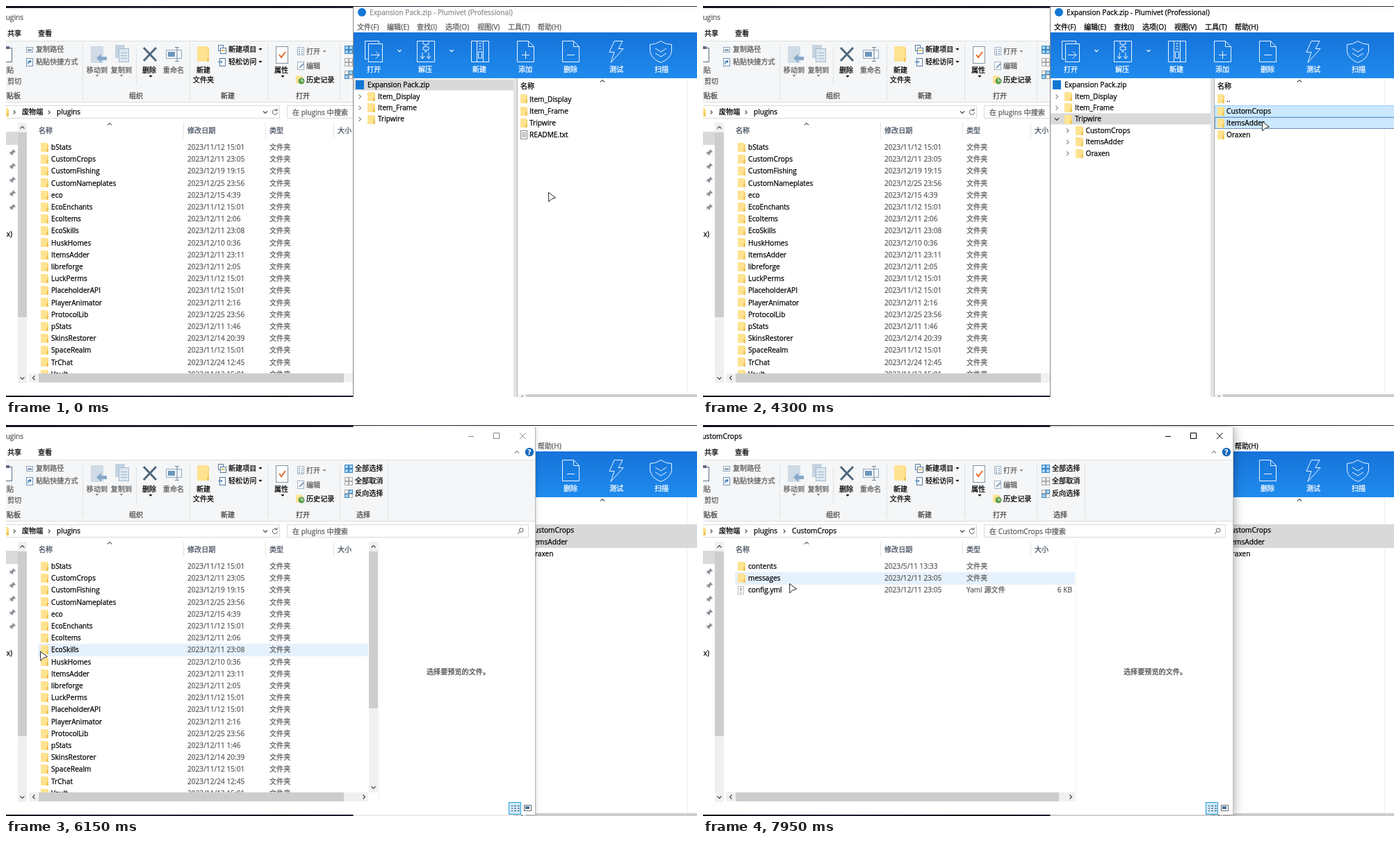
Write an HTML page with a canvas that moves like this. It is 994x563 px and loops after 8000 ms.

```html
<!DOCTYPE html>
<html lang="zh-CN">
<head>
<meta charset="utf-8">
<title>Copying plugin folders</title>
<style>
html, body { margin: 0; width: 100%; height: 100%; overflow: hidden; background: #fff; }
canvas { display: block; }
</style>
</head>
<body>
<canvas id="stage" width="994" height="563"></canvas>
<script>
const ctx = document.getElementById('stage').getContext('2d');
const LOOP = 8000;
const FONT = '"Open Sans", "Noto Sans CJK SC", "Noto Sans CJK", sans-serif';
const INK = '#000', GREY = '#5c5c5c', PALE = '#8c8c8c', BLUE = '#3a78b5';

// Moments (ms) at which the interface changes abruptly
const AT = {
  selectFolder: 1400, treeRefresh: 1570, openFolder: 1660,
  pickFirst: 3200, pickSecond: 4050, drop: 5550, copied: 6400,
  pickTarget: 7400, openTarget: 7600
};

// Pointer stops: time, x, y
const STOPS = [
  [0, 780, 268], [200, 780, 268], [1150, 778, 178], [1750, 778, 178],
  [2550, 796, 158], [3300, 796, 156], [3950, 804, 166], [4350, 804, 166],
  [5450, 40, 330], [5900, 40, 330], [6950, 102, 299], [7330, 118, 226],
  [7650, 118, 226], [7950, 124, 228], [8000, 124, 228]
];

const PLUGINS = `bStats,11/12 15:01;CustomCrops,12/11 23:05;CustomFishing,12/19 19:15;
CustomNameplates,12/25 23:56;eco,12/15 4:39;EcoEnchants,11/12 15:01;EcoItems,12/11 2:06;
EcoSkills,12/11 23:08;HuskHomes,12/10 0:36;ItemsAdder,12/11 23:11;libreforge,12/11 2:05;
LuckPerms,11/12 15:01;PlaceholderAPI,11/12 15:01;PlayerAnimator,12/11 2:16;
ProtocolLib,12/25 23:56;pStats,12/11 1:46;SkinsRestorer,12/14 20:39;SpaceRealm,11/12 15:01;
TrChat,12/24 12:45;Vault,11/12 15:01`.split(';').map(row => row.trim().split(','));
const COPIED_DATES = { CustomCrops: '5/11 13:33', ItemsAdder: '4/19 23:00' };
const CROPS = [['contents', '5/11 13:33'], ['messages', '12/11 23:05'], ['config.yml', '12/11 23:05']];

function pointerAt(t) {
  const i = Math.max(1, STOPS.findIndex(stop => stop[0] > t));
  const [t0, x0, y0] = STOPS[i - 1], [t1, x1, y1] = STOPS[i];
  const k = (t - t0) / (t1 - t0), ease = k * k * (3 - 2 * k);
  return { x: x0 + (x1 - x0) * ease, y: y0 + (y1 - y0) * ease };
}

function rect(x, y, w, h, color) {
  ctx.fillStyle = color;
  ctx.fillRect(x, y, w, h);
}

function frame(x, y, w, h, color, dash = []) {
  ctx.strokeStyle = color;
  ctx.lineWidth = 1;
  ctx.setLineDash(dash);
  ctx.strokeRect(x + .5, y + .5, w - 1, h - 1);
  ctx.setLineDash([]);
}

function line(path, color, width = 1) {
  ctx.strokeStyle = color;
  ctx.lineWidth = width;
  ctx.stroke(new Path2D(path));
}

function fill(path, color) {
  ctx.fillStyle = color;
  ctx.fill(new Path2D(path));
}

function disc(x, y, r, color) {
  ctx.fillStyle = color;
  ctx.beginPath();
  ctx.arc(x, y, r, 0, 7);
  ctx.fill();
}

// y is the visual middle of the line; a hairline stroke gives the sturdier screen look
function text(str, x, y, color = INK, align = 'left', weight = 400) {
  ctx.font = `${weight} 10.15px ${FONT}`;
  ctx.textAlign = align;
  ctx.fillStyle = ctx.strokeStyle = color;
  ctx.lineWidth = .25;
  ctx.fillText(str, x, y + 3.7);
  ctx.strokeText(str, x, y + 3.7);
}

function chevron(x, y, dir, color = '#444', r = 3) {
  const [a, b] = { up: [0, -1], down: [0, 1], left: [-1, 0], right: [1, 0] }[dir];
  const h = r / 2;
  line(`M${x - a * h - b * r} ${y - b * h - a * r}L${x + a * h} ${y + b * h}L${x - a * h + b * r} ${y - b * h + a * r}`, color, 1.2);
}

function caret(x, y, color = INK) {
  fill(`M${x - 2.5} ${y - 1}h5l-2.5 3z`, color);
}

function folder(x, y, w = 11, h = 13) {
  rect(x, y - h / 2, w - 1, h, '#ffe391');
  rect(x + w - 2, y - h / 2 + 2, 2, h - 2, '#f8d775');
  rect(x + w - 3, y + h / 2 - 5, 3, 5, '#efc65c');
}

function page(x, y, w, h, color = '#888') {
  rect(x, y, w, h, '#fff');
  frame(x, y, w, h, color);
}

function tick(x, y, color) {
  line(`M${x - 4} ${y}l3 4l6-8`, color, 2);
}

function desktop() {
  const g = ctx.createLinearGradient(0, 0, 994, 0);
  ['#15131f', '#292438', '#171420', '#332a45', '#10101a', '#252338'].forEach((c, i) => g.addColorStop(i / 5, c));
  rect(0, 0, 994, 563, g);
}

function drawExplorer(t, pointer) {
  const raised = t >= AT.drop, active = t >= AT.copied, inside = t >= AT.openTarget;
  const name = inside ? 'CustomCrops' : 'plugins';
  const right = active ? 763 : 762;

  ctx.save();
  ctx.shadowColor = active ? 'rgba(0,0,0,.4)' : 'rgba(0,0,0,.2)';
  ctx.shadowBlur = active ? 14 : 6;
  rect(-20, 3, right + 20, 558, '#fff');
  ctx.restore();
  line(`M${right - .5} 3v558`, active ? '#c4c4c4' : '#b4b4b4');

  const titleInk = active ? INK : PALE;
  text(name, inside ? 56 : 25, 16, active ? INK : GREY, 'right');
  line('M665 16.5h8', titleInk);
  frame(701, 11, 9, 9, titleInk);
  line('M739 11.5l8.5 8.5m0-8.5l-8.5 8.5', titleInk);
  text('共享', 2, 39);
  text('查看', 46, 39);
  chevron(735, 39, 'up', PALE);
  disc(753, 39, 6.2, '#1769bd');
  text('?', 753, 39, '#fff', 'center', 700);

  drawRibbon(right);
  drawAddress(name, active, inside);
  drawNavigation();
  drawFiles(t, pointer, raised, active, inside);

  text('选择要预览的文件。', 605, 355, '#444');
  rect(723, 543, 18, 18, '#cce8ff');
  frame(723, 543, 18, 18, '#26a0da');
  for (let i = 0; i < 3; i++) {
    line(`M727 ${548.5 + i * 3.5}h2m2 0h3m2 0h3`, '#345');
  }
  frame(745, 547, 11, 9, '#666');
  rect(747, 549, 6, 4, '#47719a');
}

function drawRibbon(right) {
  rect(0, 50, right - 1, 89, '#f5f6f7');
  line(`M0 50.5H${right - 1}M0 138.5H${right - 1}`, '#dcdddf');
  line('M110.5 54v81M264.5 54v81M376.5 54v81M480.5 54v81M549.5 54v81M187.5 60v54', '#e0e1e3');

  // Clipboard
  page(-8, 60, 17, 21, '#587089');
  rect(-8, 58, 13, 4, '#668');
  text('粘贴', 11, 92, GREY, 'right');
  text('剪切', 2, 108, GREY);
  text('剪贴板', 21, 129, '#444', 'right');
  frame(29, 59, 10, 8, '#8fa6bd');
  line('M31 63.5h6', '#5c83a8', 2);
  text('复制路径', 43, 62.5, GREY);
  page(29, 75, 10, 12, '#6c93bb');
  line('M32 84v-4h4m-2-2l2 2-2 2', BLUE, 1.3);
  text('粘贴快捷方式', 43, 80.5, GREY);

  // Organise
  rect(122, 58, 18, 24, '#cfdbe6');
  fill('M130 75l7-6v4h8v5h-8v4z', '#86a9cb');
  text('移动到', 131, 92, GREY, 'center');
  rect(157, 56, 14, 19, '#c6d3df');
  page(162, 61, 15, 20, '#a4bace');
  rect(163, 62, 13, 18, '#dce7f1');
  line('M165 67.5h9m-9 4h9m-9 4h9', '#a4bace');
  text('复制到', 166, 92, GREY, 'center');
  caret(131, 100, PALE);
  caret(166, 100, PALE);
  line('M198 60l18 19m0-19l-18 19', '#50677f', 3);
  text('删除', 206, 92.5, INK, 'center');
  caret(208, 101);
  frame(230, 63, 23, 13, '#8ca9c5');
  rect(233, 66, 10, 7, '#6d96bd');
  line('M243 59.5h6m-3 0v20m-3 0h6', '#71869a');
  text('重命名', 241, 92, GREY, 'center');
  text('组织', 187, 129, '#444', 'center');

  // New
  folder(275, 69, 17, 22);
  text('新建', 284, 92, INK, 'center');
  text('文件夹', 284, 106, INK, 'center');
  page(305, 56, 8, 9, '#53789c');
  page(308, 60, 9, 9, '#53789c');
  rect(310, 63, 5, 2, '#e2b94c');
  text('新建项目', 320, 62.5);
  page(307, 75, 9, 12, '#53789c');
  line('M305 80.5h6m-2-2l2 2-2 2', BLUE);
  text('轻松访问', 320, 80.5);
  caret(366, 62);
  caret(366, 80);
  text('新建', 319, 129, '#444', 'center');

  // Open
  page(388, 58, 18, 25, '#8492a0');
  tick(397, 70, '#e36b2f');
  text('属性', 396, 92.5, INK, 'center');
  caret(398, 101);
  page(419, 59, 10, 12, '#9fb2c5');
  line('M421 62.5h2m2 0h2m-6 3h2m2 0h2m-6 3h2m2 0h2', '#6f92b3', 1.5);
  text('打开', 432, 65.5, GREY);
  caret(458, 65, PALE);
  page(419, 80, 10, 12, '#9fb2c5');
  line('M422 89l6-6', '#7f9cb8', 2);
  text('编辑', 432, 86, GREY);
  folder(417, 106, 10, 11);
  disc(425, 108, 4.5, '#5da14c');
  line('M425 105v3h3', '#fff');
  text('历史记录', 432, 106);
  text('打开', 427, 129, '#444', 'center');

  // Select
  [62.5, 80.5, 98.5].forEach((y, row) => {
    for (let i = 0; i < 4; i++) {
      const on = row === 0 || row === 2 && (i === 1 || i === 2);
      const x = 487 + i % 2 * 6, top = Math.round(y - 6) + (i >> 1) * 6;
      rect(x, top, 6, 6, on ? '#a9d4f4' : '#f7f7f7');
      frame(x, top, 6, 6, on ? '#3b87c3' : '#aaa');
    }
    text(['全部选择', '全部取消', '反向选择'][row], 502, y);
  });
  text('选择', 514, 129, '#444', 'center');
}

function drawAddress(name, active, inside) {
  frame(-2, 143, 396, 19, '#d9d9d9');
  frame(404, 143, 348, 19, '#d9d9d9');
  folder(-7, 153, 11, 12);
  chevron(12, 153, 'right', '#555', 2.5);
  text('废物端', 23, 152);
  chevron(62, 153, 'right', '#555', 2.5);
  text('plugins', 73, 152);
  if (active) chevron(117, 153, 'right', '#555', 2.5);
  if (inside) text(name, 128, 152);
  chevron(373, 153, 'down');
  line('M389.5 150.3a3.6 3.6 0 1 0 1 3M390 147.5v3.2h-3', '#555');
  text(`在 ${name} 中搜索`, 412, 153, GREY);
  line('M744 151.5a2.8 2.8 0 1 0-5.6 0a2.8 2.8 0 1 0 5.6 0M739 153.5l-3 3.5', '#555');
}

function drawNavigation() {
  rect(0, 181, 17, 19, '#d9d9d9');
  for (let i = 0; i < 5; i++) {
    const y = 210 + i * 19.7;
    fill(`M10 ${y - 4}l4 4l-1 1l-1-.5l-2 2v2l-1 .5l-4-4l.5-1h2l2-2z`, '#8a9096');
    line(`M8 ${y + 1}l-3 3`, '#8a9096');
  }
  text('x)', 9, 328, INK, 'right');
  rect(17, 168, 13, 375, '#f0f0f0');
  rect(17, 182, 13, 266, '#cdcdcd');
  chevron(23.5, 175, 'up');
  chevron(23.5, 536, 'down');
}

function drawFiles(t, pointer, raised, active, inside) {
  const rows = inside ? CROPS : PLUGINS, end = inside ? 535 : 521;
  const head = '#434e5e';
  text('名称', 47, 179, head);
  chevron(149, 170, 'up', '#666');
  text('修改日期', 261, 179, head);
  text('类型', 379, 179, head);
  text('大小', 477, 179, head);
  line('M255.5 168v22M373.5 168v22M471.5 168v22', '#e5e5e5');

  ctx.save();
  ctx.beginPath();
  ctx.rect(30, 190, 507, 340);
  ctx.clip();
  rows.forEach(([name, date], i) => {
    const y = 203.2 + i * 17.2, top = Math.round(y - 8.3);
    const over = pointer.x >= 46 && pointer.x < (raised ? end : 500) && Math.abs(pointer.y - 2 - y) < 8.6;
    const picked = !inside && name === 'CustomCrops' && t >= AT.pickTarget;
    if (over || picked) rect(46, top, end - 46, 18, picked ? '#cce8ff' : '#e5f1fd');
    if (active && !inside && (picked || i === 0 && t < AT.pickTarget)) frame(46, top, end - 46, 18, '#a9d6f7');
    const isFile = name.endsWith('.yml');
    if (isFile) {
      page(50, top + 3, 9, 12, '#bbb');
      line(`M54.5 ${top + 5.5}v4m0 1.5v1.5`, '#555');
      text('6 KB', 531, y, GREY, 'right');
    } else {
      folder(50, top + 8.5);
    }
    text(name, 65, y);
    text('2023/' + (active && COPIED_DATES[name] || date), 261, y, GREY);
    text(isFile ? 'Yaml 源文件' : '文件夹', 379, y, GREY);
  });
  ctx.restore();

  if (!inside) {
    rect(522, 168, 13, 361, '#f0f0f0');
    rect(522, 182, 13, 226, '#cdcdcd');
    chevron(528.5, 175, 'up');
    chevron(528.5, 522, 'down');
  }
  rect(33, 529, end - 33, 13, '#f0f0f0');
  rect(47, 529, inside ? 465 : 439, 13, '#cdcdcd');
  chevron(40, 535.5, 'left');
  chevron(end - 6, 535.5, 'right');
  line('M536.5 168v375', '#f3f3f3');
}

function drawArchiver(t, pointer) {
  const active = t >= AT.selectFolder && t < AT.drop || t >= AT.copied;
  const opened = t >= AT.openFolder;
  rect(499, 1, 495, 562, '#fff');
  line('M499.5 1v562', '#888');
  disc(512, 9, 6, '#1277d5');
  text('Expansion Pack.zip - Plumivet (Professional)', 523, 9.5, active ? INK : PALE);
  ['文件(F)', '编辑(E)', '查找(I)', '选项(O)', '视图(V)', '工具(T)', '帮助(H)'].forEach((label, i) =>
    text(label, [505, 548, 591, 632, 678, 722, 765][i], 30, active ? INK : GREY));
  drawToolbar();

  // Folder tree
  const selectedY = opened ? 162.5 : 113.5;
  if (opened || t < AT.treeRefresh) rect(500, selectedY - 8, 230, 16, '#d9d9d9');
  rect(503, 107, 12, 13, '#1277d5');
  text('Expansion Pack.zip', 520, 113.5);
  const branch = (label, depth, y, isOpen) => {
    const x = 520 + depth * 15.5;
    chevron(x - 11, y + .5, isOpen ? 'down' : 'right', isOpen ? '#333' : PALE);
    folder(Math.round(x), Math.round(y) + .5, 11, 13);
    text(label, x + 15, y);
  };
  branch('Item_Display', 0, 130);
  branch('Item_Frame', 0, 146.2);
  if (opened || t < AT.treeRefresh) branch('Tripwire', 0, 162.5, opened);
  if (opened) ['CustomCrops', 'ItemsAdder', 'Oraxen'].forEach((label, i) => branch(label, 1, 179 + i * 16.4));

  // File list
  rect(730, 104, 5, 459, '#e3e3e3');
  line('M735.5 104v459', '#b5b5b5');
  line('M980.5 105v454', '#efefef');
  text('名称', 740, 115);
  chevron(858, 108, 'up', '#555');
  const rows = opened ? ['..', 'CustomCrops', 'ItemsAdder', 'Oraxen'] : ['Item_Display', 'Item_Frame', 'Tripwire', 'README.txt'];
  const focused = opened ? (t >= AT.pickSecond ? 2 : 1) : 2;
  rows.forEach((label, i) => {
    const y = 133.8 + i * 17.2, top = Math.round(y - 8.5);
    const picked = opened
      ? i === 1 && t >= AT.pickFirst || i === 2 && t >= AT.pickSecond
      : i === 2 && t >= AT.selectFolder;
    const over = pointer.x > 736 && Math.abs(pointer.y - 2 - y) < 8.6;
    if (picked) {
      const behind = t >= AT.drop;
      rect(736, top, 258, 17, behind ? '#d9d9d9' : '#cce8ff');
      if (!behind) {
        frame(736, top, 259, 17, '#99d1ff');
        if (i === focused) frame(736, top, 259, 17, '#456', [1, 1]);
      }
    } else if (over) {
      rect(736, top, 258, 17, '#e5f1fd');
    }
    if (label.endsWith('.txt')) {
      page(740, top + 2, 10, 13);
      line(`M742 ${top + 5.5}h6m-6 2h6m-6 2h6m-6 2h6`, '#999');
    } else {
      folder(740, top + 8.5, 10, 13);
    }
    text(label, 753, y);
  });
  rect(736, 559, 258, 4, '#f0f0f0');
  rect(748, 559, 246, 4, '#cdcdcd');
  line('M741 563l2.5-2', '#444');
}

function drawToolbar() {
  const g = ctx.createLinearGradient(0, 38, 0, 104);
  g.addColorStop(0, '#1673d9');
  g.addColorStop(1, '#1f8bee');
  rect(500, 38, 494, 66, g);
  ['打开', '解压', '新建', '添加', '删除', '测试', '扫描'].forEach((label, i) =>
    text(label, [529, 603, 681, 747, 812, 878, 943][i], 91, '#fff', 'center', 500));
  chevron(566, 64.5, 'down', '#fff', 2.5);
  chevron(641, 64.5, 'down', '#fff', 2.5);
  const sheet = x => `M${x} 50.5h16l8 8v22h-24zM${x + 16} 50.5v8h8`;
  const icons = [
    'M520 76.5h-3.5v-26h20v4M521.5 54.5h20v26h-20zM525 70.5h12m-5-5l5 5-5 5',
    'M591.5 50.5h25v30h-25zM600 50v5h3v4h-3v4h3v4m5-17v5h-3v4h3v4h-3v4M599 67v9m9-9v9M596 72l3 4 3-4m3 0l3 4 3-4',
    'M669.5 50.5h25v30h-25zM677.5 50v30m9-30v30M680 54h4m-4 4h4m-4 4h4M679.5 66h5v9h-5z',
    sheet(735.5) + 'M742 70.5h11m-5.5-5.5v11',
    sheet(800.5) + 'M807 70.5h11',
    'M875 50.5h12l-6 11h7l-18 20 5-15h-7z',
    'M942 50.5q7 5 15.5 5v10q-2 11-15.5 16q-13.5-5-15.5-16v-10q8.5 0 15.5-5zM934 61l8 5 8-5M934 68l8 5 8-5'
  ];
  icons.forEach(path => line(path, '#eaf4ff'));
}

function drawPointer({ x, y }) {
  ctx.save();
  ctx.translate(x, y);
  ctx.lineJoin = 'round';
  const arrow = 'M.5.5L10.5 8L4.5 10.2L.8 14Z';
  fill(arrow, '#fff');
  line(arrow, '#222');
  ctx.restore();
}

function render(now) {
  const t = now % LOOP, pointer = pointerAt(t);
  desktop();
  const windows = [drawExplorer, drawArchiver];
  if (t >= AT.drop) windows.reverse();
  windows.forEach(draw => draw(t, pointer));
  drawPointer(pointer);
}

const start = performance.now();
function tickFrame() {
  render(performance.now() - start);
  requestAnimationFrame(tickFrame);
}
tickFrame();
</script>
</body>
</html>
```
